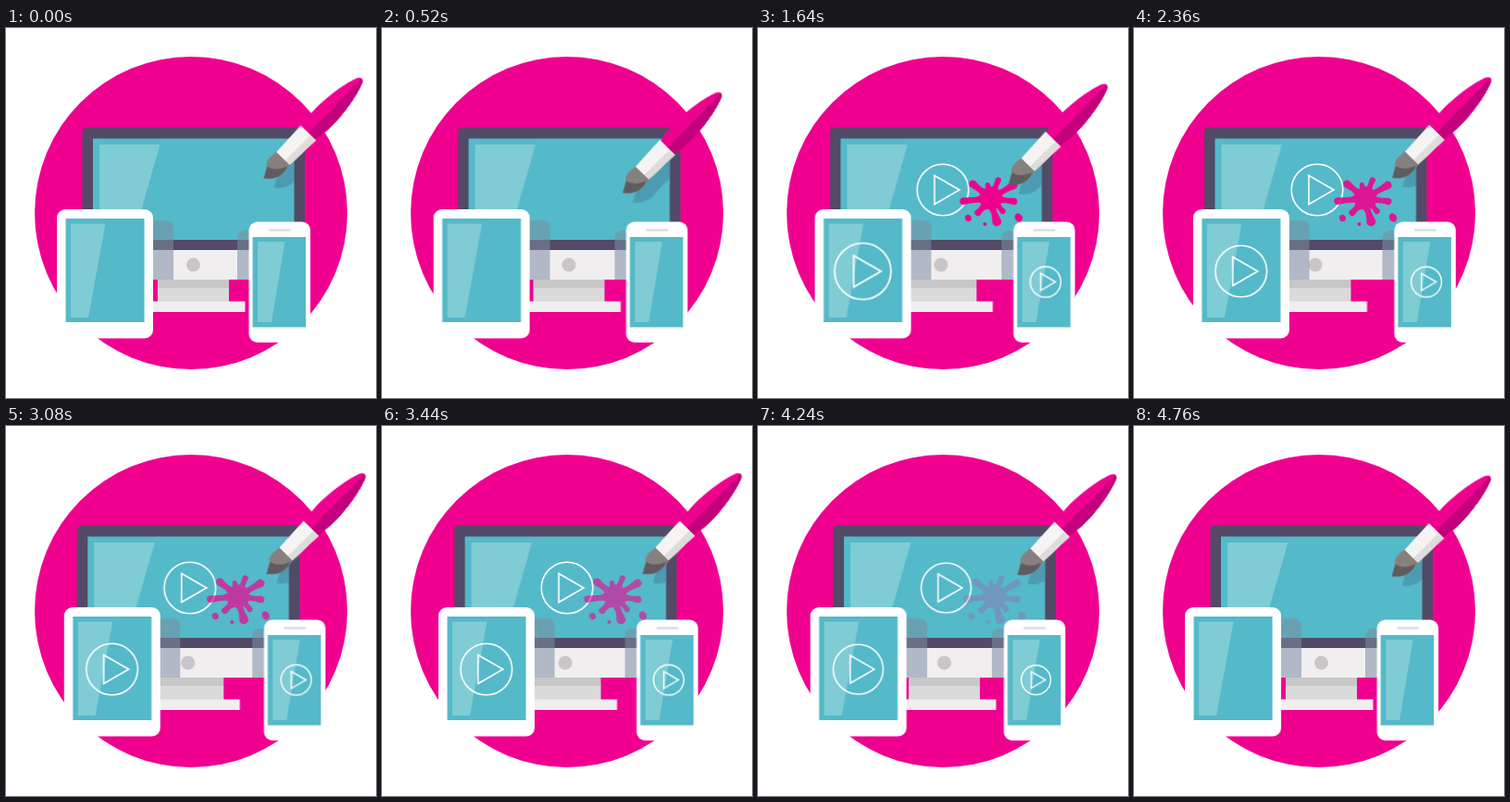
An HTML page that plays this animation: 400 px wide and 400 px high, repeating every 4.8 s.

```html
<!DOCTYPE html>
<html lang="en">
<head>
<meta charset="utf-8">
<title>Responsive design</title>
<style>
  html, body { margin: 0; width: 100%; height: 100%; overflow: hidden; background: #fff; }
  svg { display: block; width: 100%; height: 100%; }
  .pink { fill: #f0008f; }
  .screen { fill: #54b9c8; }
  .gloss { fill: #7fccd4; }
  .white { fill: #fff; }
  .shade { fill: #7b8ea3; fill-opacity: .55; }
  .play { fill: none; stroke: #fff; stroke-width: 1.6; }
</style>
</head>
<body>
<svg viewBox="0 0 400 400">
  <defs>
    <clipPath id="body"><path d="M82.500 107.500H323V272H82.500Z"/></clipPath>
    <clipPath id="glass"><path d="M94 119.500H311.500V229H94Z"/></clipPath>
    <path id="hairs" d="M0 0C6-3 9-5 12-7C14-10 17-11 21-11L32-10V10L22 11C12 12 4 6 0 0Z"/>
    <path id="ferrule" d="M30-10L69-11.500V11.500L30 10Z"/>
    <g id="play">
      <circle r="27.800"/>
      <path d="M-9-15.500L18 0L-9 15.500Z"/>
    </g>
  </defs>

  <circle class="pink" cx="200" cy="200" r="169"/>

  <g id="monitor">
    <path fill="#dadada" d="M164 272H241V296H164Z"/>
    <path fill="#c8c7c8" d="M164 272H241V281H164Z"/>
    <path fill="#f1eef0" d="M147 295.500H258.500V307H147Z"/>
    <path fill="#f1eef0" d="M82.500 238H323V272H82.500Z"/>
    <path fill="#524a66" d="M82.500 240V112.500a5 5 0 0 1 5-5H318a5 5 0 0 1 5 5V240Z"/>
    <path class="screen" d="M94 119.500H311.500V229H94Z"/>
    <path class="gloss" d="M101 126H166.500L137 229H101Z"/>
    <circle fill="#c9c5c9" cx="202.500" cy="256" r="7.500"/>
    <g transform="translate(204.500 175)"><use id="playMonitor" class="play" href="#play"/></g>
    <g transform="translate(256.500 184)"><g id="splat" class="pink"></g></g>
    <g clip-path="url(#body)">
      <rect id="tabletShade" class="shade" x="77" y="208" width="104" height="139" rx="8"/>
      <rect id="phoneShade" class="shade" x="250" y="219" width="66" height="130" rx="8"/>
    </g>
    <g clip-path="url(#glass)">
      <g id="unshift"><g id="brushShade">
        <g transform="translate(289.500 172.500) rotate(-45.500)" fill="#467896" opacity=".45">
          <use href="#hairs"/><use href="#ferrule"/>
        </g>
      </g></g>
    </g>
  </g>

  <g id="tablet">
    <rect class="white" x="55" y="196" width="104" height="139.500" rx="9"/>
    <path class="screen" d="M64.500 206H149.500V318H64.500Z"/>
    <path class="gloss" d="M70 211.500H107.500L89 313H70Z"/>
    <g transform="translate(106.800 263)"><use id="playTablet" class="play" href="#play"/></g>
  </g>

  <g id="phone">
    <rect class="white" x="262.500" y="209.500" width="66.500" height="130.500" rx="9"/>
    <path class="screen" d="M266.500 226H324V323.500H266.500Z"/>
    <path class="gloss" d="M272 231H301.500L287 318H272Z"/>
    <path stroke="#dcdcdc" stroke-width="2.400" stroke-linecap="round" d="M285 218.500H306.500"/>
    <g transform="translate(297.200 274.500) scale(.59)"><use id="playPhone" class="play" style="stroke-width:2.400" href="#play"/></g>
  </g>

  <g id="brush">
    <g transform="translate(278.500 162.500) rotate(-45.500)">
      <use href="#hairs" fill="#86817e"/>
      <path fill="#605b60" d="M0 0C6-3 9-5 12-6Q14 4 27 9L22 11C12 12 4 6 0 0Z"/>
      <use href="#ferrule" fill="#f5f4f3"/>
      <path fill="#dfdddb" d="M30 3L69 3.500V11.500L30 10Z"/>
      <path class="pink" d="M69-10C90-16 126-12 148-4Q155 0 148 4C126 12 90 16 69 10Z"/>
      <path fill="#c3007b" d="M69 0H151.500Q151 3 148 4C126 12 90 16 69 10Z"/>
    </g>
  </g>
</svg>

<script>
const LOOP = 4800;
const $ = id => document.getElementById(id);
const move = (x, y = 0) => `translate(${x}px, ${y}px)`;

// rows: [time, value, easing to the next row]
function animate(id, prop, rows, delay = 0) {
  const frames = rows.map(([time, value, easing = 'linear']) =>
    ({ offset: time / LOOP, [prop]: value, easing }));
  $(id).animate(frames, { duration: LOOP, iterations: Infinity, delay: delay - LOOP });
}

// Devices drift sideways and back
const drift = { monitor: -6.6, tablet: 9, phone: 19 };
function sway(id, dx) {
  const sine = 'cubic-bezier(.37, 0, .63, 1)';
  animate(id, 'transform', [[0, move(0), sine], [LOOP / 2, move(dx), sine], [LOOP, move(0)]], 100);
}
for (const id in drift) sway(id, drift[id]);
sway('tabletShade', drift.tablet - drift.monitor);
sway('phoneShade', drift.phone - drift.monitor);
sway('unshift', -drift.monitor);

// Brush dips, then floats back up
const dip = d => move(d, -.86 * d);
for (const id of ['brush', 'brushShade']) {
  animate(id, 'transform', [
    [0, dip(0), 'ease-in-out'],
    [760, dip(-23)],
    [800, dip(-23), 'ease'],
    [3300, dip(3.2), 'cubic-bezier(.33, 0, .67, .33)'],
    [LOOP, dip(0)]
  ]);
}

// Play buttons pop in one after the other
const starts = { playMonitor: 950, playTablet: 1400, playPhone: 1490 };
for (const id in starts) {
  const start = starts[id];
  animate(id, 'transform', [
    [0, 'scale(0)'],
    [start, 'scale(0)', 'cubic-bezier(.34, 1.56, .64, 1)'],
    [start + 400, 'scale(1)'],
    [4200, 'scale(1)', 'ease-in'],
    [4500, 'scale(0)'],
    [LOOP, 'scale(0)']
  ]);
}

// Paint splat: arms as [angle, reach, tip radius], then loose drops
const arms = [
  [-68, 21, 3.2], [-30, 28, 4.4], [8, 25, 3.8], [48, 19, 3.2], [76, 26, 5],
  [132, 21, 3.6], [174, 30, 4], [218, 25, 4.2], [256, 15, 2.4]
];
const drops = [[30, 21, 4, 4.8], [-24.500, 21.500, 3.4, 3.8], [-6.500, 28, 2, 2]];

function splatPath() {
  const polar = (deg, r) => {
    const a = deg * Math.PI / 180;
    return [r * Math.cos(a), r * Math.sin(a)];
  };
  const at = ([x, y]) => `${x.toFixed(2)} ${y.toFixed(2)}`;
  let d = '';
  arms.forEach(([deg, reach, r], i) => {
    const [x, y] = polar(deg, reach);
    const [px, py] = polar(deg + 90, r);
    const next = arms[(i + 1) % arms.length][0] + (i === arms.length - 1 ? 360 : 0);
    const prev = arms.at(i - 1)[0] - (i ? 0 : 360);
    if (!i) d = 'M' + at(polar((prev + deg) / 2, 12));
    d += `Q${at(polar(deg - 8, 14))} ${at([x - px, y - py])}`;
    d += `A${r} ${r} 0 0 1 ${at([x + px, y + py])}`;
    d += `Q${at(polar(deg + 8, 14))} ${at(polar((deg + next) / 2, 12))}`;
  });
  return d + 'Z';
}

$('splat').innerHTML = `<path d="${splatPath()}"/>` + drops.map(([x, y, rx, ry]) =>
  `<ellipse rx="${rx}" ry="${ry}" transform="translate(${x} ${y}) rotate(-30)"/>`).join('');
animate('splat', 'transform', [
  [0, 'scale(0)'], [700, 'scale(0)', 'ease-out'], [1000, 'scale(1)'], [LOOP, 'scale(1)']
]);
animate('splat', 'opacity', [[0, 1], [1900, 1], [3760, .52], [4500, 0], [LOOP, 0]]);
</script>
</body>
</html>
```
